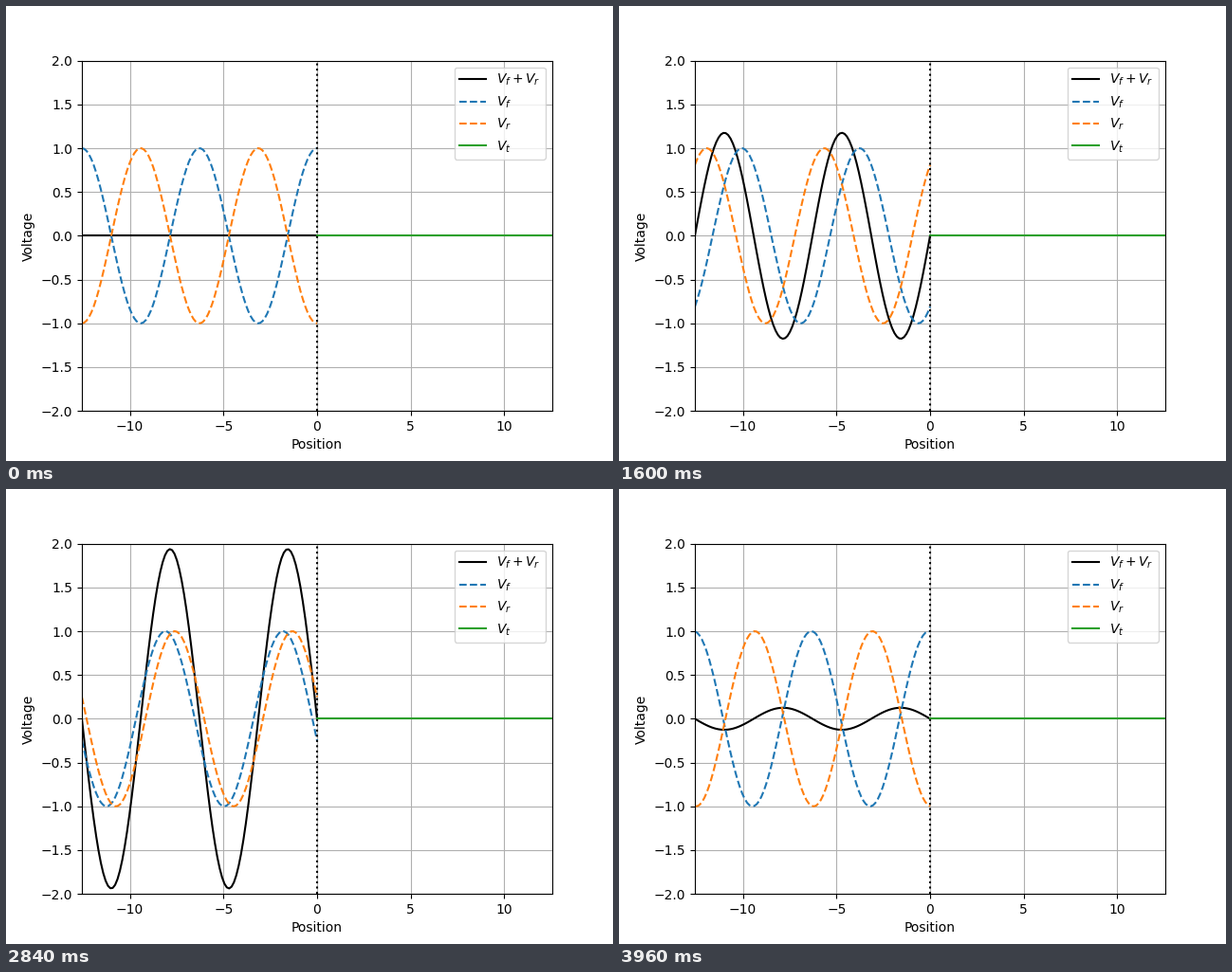
Animation of 640x480 px, one loop 4 s. Source, as a matplotlib script:

```python
import numpy as np
import matplotlib.pyplot as plt
from matplotlib.animation import FuncAnimation

FRAMES = 100
INTERVAL = 40
LENGTH = 4 * np.pi

fig, ax = plt.subplots(figsize=(6.4, 4.8), dpi=100)
left = np.linspace(-LENGTH, 0, 100)
right = np.linspace(0, LENGTH, 100)


def waves(phase):
    """Forward and reflected waves for a short-circuit load."""
    forward = np.cos(left - phase)
    reflected = -np.cos(left + phase)
    return forward, reflected


fwd, ref = waves(0)
total_line, = ax.plot(left, fwd + ref, "k", label="$V_f + V_r$")
fwd_line, = ax.plot(left, fwd, "--", color="C0", label="$V_f$")
ref_line, = ax.plot(left, ref, "--", color="C1", label="$V_r$")
ax.plot(right, np.zeros_like(right), color="C2", label="$V_t$")
ax.axvline(0, color="k", linestyle=":")

ax.set_xlim(-LENGTH, LENGTH)
ax.set_ylim(-2, 2)
ax.set_xlabel("Position")
ax.set_ylabel("Voltage")
ax.grid(True)
ax.legend(loc="upper right")


def update(frame):
    fwd, ref = waves(2 * np.pi * frame / FRAMES)
    total_line.set_ydata(fwd + ref)
    fwd_line.set_ydata(fwd)
    ref_line.set_ydata(ref)
    return total_line, fwd_line, ref_line


anim = FuncAnimation(fig, update, frames=FRAMES, interval=INTERVAL,
                     repeat=True, repeat_delay=0)
plt.show()
```
